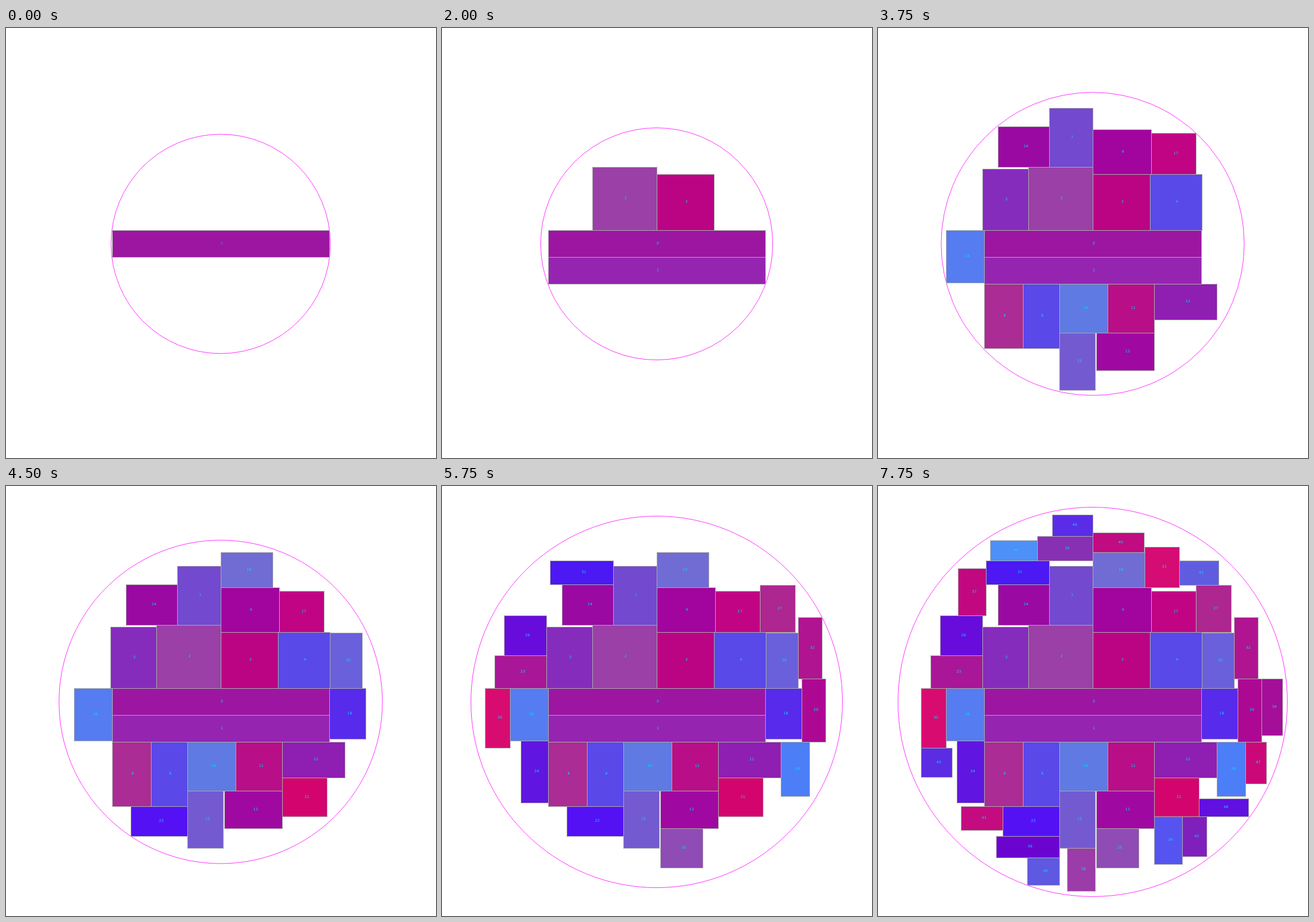
Recreate the animation shown at these times as an HTML page. Size 721 by 721 pixels, loop 8000 ms.

```html
<!DOCTYPE html>
<html lang="en">
<head>
<meta charset="utf-8">
<title>Packing rectangles in a circle</title>
<style>
  html, body { margin: 0; width: 100%; height: 100%; overflow: hidden; background: #fff; }
  svg { display: block; width: 100%; height: 100%; }
  text { font: 6px "DejaVu Sans", sans-serif; }
</style>
</head>
<body>
<svg id="stage" viewBox="0 0 721 721">
  <circle id="ring" cx="360" cy="362" fill="none" stroke="#f0f" stroke-width="0.8"/>
  <g id="tiles"></g>
</svg>
<script>
const LOOP = 8000, HOLD = 1500, STEP = 250;
const CX = 360, CY = 362;
const LEFT = -1, RIGHT = 1, UP = -1, DOWN = 1;
const ring = document.getElementById("ring");
const group = document.getElementById("tiles");
const tiles = [];

// Lay tiles side by side from a corner; each is [id, width, height, colour].
function row(x, y, dx, dy, ...items) {
  for (const [id, w, h, color] of items) {
    tiles[id] = {
      x: (dx > 0 ? x : x - w) + 0.5,
      y: (dy > 0 ? y : y - h) + 0.5,
      w, h, color
    };
    x += dx * w;
  }
}

// Centre
row(178, 339, RIGHT, DOWN, [0, 364, 45, "#9c16a2"]);
row(178, 384, RIGHT, DOWN, [1, 364, 45, "#9525b0"]);

// Upper right
row(360, 339, RIGHT, UP, [3, 96, 94, "#ba0484"], [4, 87, 94, "#5849e8"], [20, 54, 93, "#6a60dc"]);
row(360, 245, RIGHT, UP, [6, 98, 75, "#a2049e"], [17, 75, 69, "#c00484"], [27, 59, 79, "#ae2690"]);
row(360, 170, RIGHT, UP, [19, 87, 59, "#706cd4"], [33, 58, 68, "#d40c74"]);
row(360, 111, RIGHT, UP, [40, 86, 33, "#c00c80"]);
row(505, 166, RIGHT, UP, [43, 66, 41, "#605ce0"]);
row(597, 323, RIGHT, UP, [32, 40, 103, "#b01490"]);

// Upper left
row(360, 339, LEFT, UP, [2, 108, 106, "#9a40a6"], [5, 77, 103, "#862cbc"], [23, 87, 55, "#aa1698"]);
row(360, 233, LEFT, UP, [7, 73, 99, "#7349d0"], [14, 86, 68, "#9a0aa2"]);
row(360, 125, LEFT, UP, [35, 93, 41, "#8830b4"], [44, 79, 34, "#4c90f8"]);
row(360, 84, LEFT, UP, [49, 68, 36, "#5a2ce8"]);
row(287, 165, LEFT, UP, [31, 106, 40, "#4c18f4"]);
row(181, 217, LEFT, UP, [37, 47, 79, "#c20880"]);
row(175, 284, LEFT, UP, [26, 71, 67, "#680cdc"]);

// Sides
row(178, 339, LEFT, DOWN, [16, 64, 88, "#557cf0"], [30, 42, 100, "#d80c70"]);
row(72, 439, RIGHT, DOWN, [45, 52, 49, "#5c2ce4"]);
row(178, 427, LEFT, DOWN, [24, 46, 104, "#6016e0"]);
row(542, 339, RIGHT, DOWN, [18, 61, 85, "#582aec"]);
row(603, 323, RIGHT, DOWN, [29, 40, 106, "#ac0894"], [39, 35, 95, "#a40e98"]);

// Below
row(178, 429, RIGHT, DOWN,
  [8, 65, 108, "#aa2c94"], [9, 61, 108, "#5a48e8"], [10, 81, 82, "#5f7ae2"],
  [11, 78, 82, "#b80e88"], [12, 105, 60, "#8f1eb2"], [28, 48, 91, "#4c7ef8"],
  [47, 35, 70, "#cc0878"]);
row(304, 511, RIGHT, DOWN, [15, 60, 96, "#745ad0"]);
row(463, 511, LEFT, DOWN, [13, 97, 63, "#a008a2"]);
row(366, 574, RIGHT, DOWN, [25, 71, 66, "#8e4cb4"]);
row(364, 607, LEFT, DOWN, [38, 47, 72, "#9c3ca8"]);
row(463, 489, RIGHT, DOWN, [21, 75, 65, "#d4046e"]);
row(463, 554, RIGHT, DOWN, [34, 47, 80, "#5654f0"], [42, 41, 67, "#8020bc"]);
row(538, 554, RIGHT, UP, [48, 83, 30, "#6010e0"]);
row(304, 537, LEFT, DOWN, [22, 95, 50, "#5412f4"], [41, 70, 40, "#c40c80"]);
row(304, 587, LEFT, DOWN, [36, 106, 36, "#6c04d0"]);
row(304, 623, LEFT, DOWN, [46, 54, 46, "#5f58e0"]);

function add(parent, name, attrs) {
  const el = document.createElementNS("http://www.w3.org/2000/svg", name);
  for (const key in attrs) el.setAttribute(key, attrs[key]);
  return parent.appendChild(el);
}

// Distance from the centre to the farthest corner of a tile
function reach({ x, y, w, h }) {
  return Math.hypot(
    Math.max(Math.abs(x - CX), Math.abs(x + w - CX)),
    Math.max(Math.abs(y - CY), Math.abs(y + h - CY)));
}

const radii = [0];
tiles.forEach((tile, id) => {
  const { x, y, w, h, color } = tile;
  tile.el = add(group, "g", {});
  add(tile.el, "rect", { x, y, width: w, height: h, fill: color, stroke: "#aaa", "stroke-width": 1 });
  tile.label = add(tile.el, "text", { x: x + w / 2 - 0.4, y: y + h / 2 + 0.5 });
  tile.label.textContent = id;
  radii.push(Math.max(radii[id], reach(tile)));
});

// Two tiles per step, with one tile running late for a while
function countAt(t) {
  if (t < HOLD) return 1;
  const k = Math.floor((t - HOLD) / STEP);
  return 2 * k - (k >= 12 && k < 20 ? 1 : 0);
}

function draw(t) {
  const n = countAt(t);
  ring.setAttribute("r", radii[n]);
  ring.style.display = n ? "" : "none";
  tiles.forEach((tile, id) => {
    tile.el.style.display = id < n ? "" : "none";
    tile.label.setAttribute("fill", t < HOLD ? "#4a86dc" : "#0df");
  });
}

const start = performance.now();
function tick() {
  draw((performance.now() - start) % LOOP);
  requestAnimationFrame(tick);
}
tick();
</script>
</body>
</html>
```
